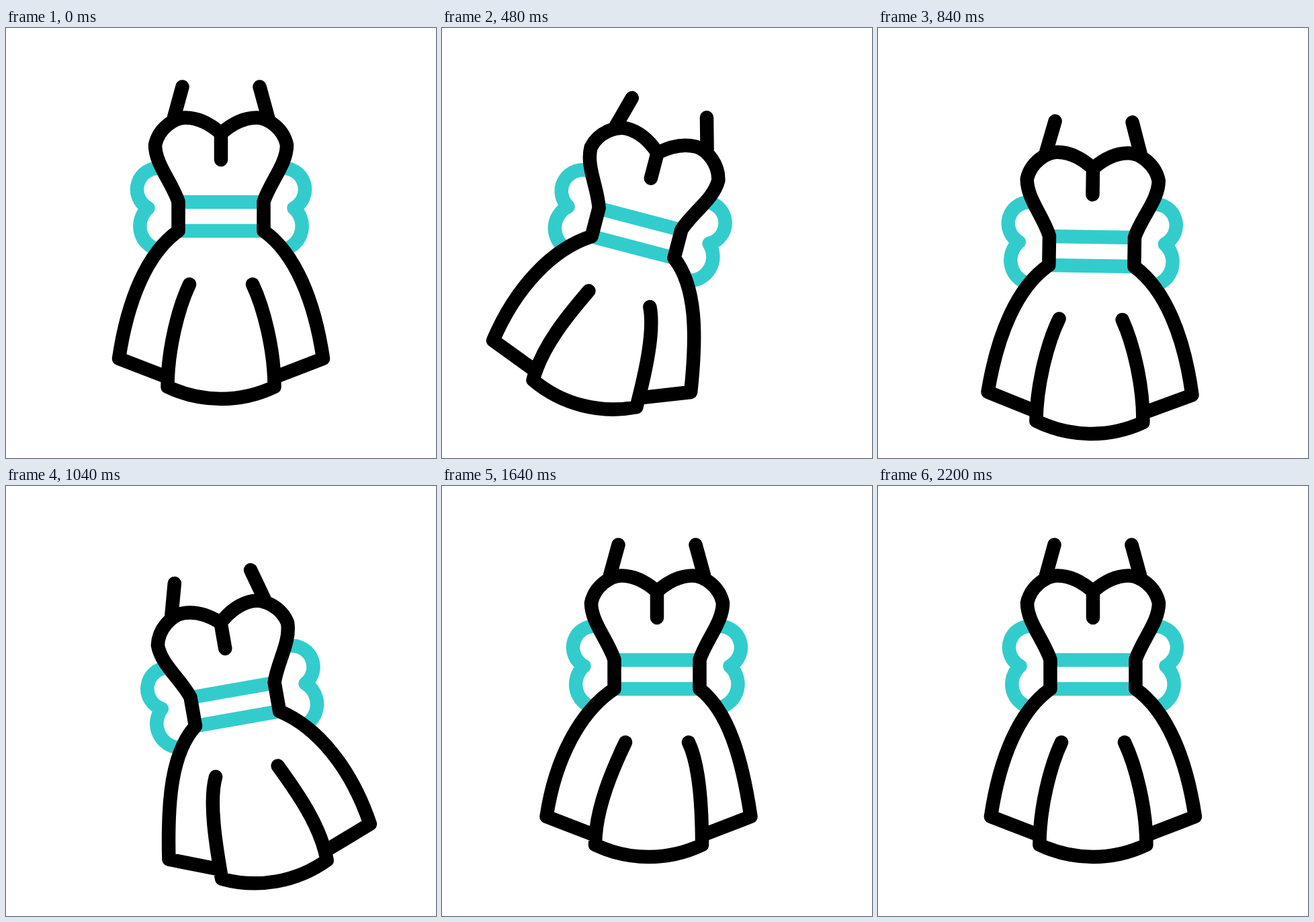
An HTML page for the animation above (2.24 s loop, 640 px wide and 640 px high).

```html
<!DOCTYPE html>
<html lang="en">
<head>
<meta charset="utf-8">
<title>Swinging dress</title>
<style>
  html, body { margin: 0; height: 100%; overflow: hidden; background: #fff; }
  svg { display: block; width: 100%; height: 100%; }
  path { fill: none; stroke-width: 20.5; stroke-linejoin: round; }
</style>
</head>
<body>
<svg viewBox="0 0 640 640">
  <g id="dress">
    <path id="bow" stroke="#3cc"/>
    <path id="cloth" stroke="#000" stroke-linecap="round"/>
  </g>
</svg>
<script>
const LOOP = 2240, STEP = 40;
const el = id => document.getElementById(id);

// Eased rise from 0 to 1 between two times
function ramp(t, from, to) {
  const u = Math.min(1, Math.max(0, (t - from) / (to - from)));
  return u * u * (3 - 2 * u);
}

// The dress sinks and rises, tilts left then right, and the skirt trails behind
const drop = t => 52 * (ramp(t, 150, 765) - ramp(t, 915, 1530));
const tilt = t => 14.7 * ramp(t, 100, 490) - 25.1 * ramp(t, 565, 1080) + 10.4 * ramp(t, 1110, 1560);
const sway = t => -16.2 * ramp(t, 140, 580) + 31.5 * ramp(t, 600, 1060)
  - 29.3 * ramp(t, 1211, 1709) + 14 * ramp(t, 1725, 2220);

// Points of one side: x from the centre line, w is the share of the skirt's shift
function pen(side, dx, dy) {
  const p = (x, y, w = 0) => `${320 + side * x + w * dx} ${y + w * dy} `;
  p.arc = (r, ...end) => `A${r} ${r} 0 0 ${side > 0 ? 1 : 0} ${p(...end)}`;
  return p;
}

const bowHalf = p =>
  `M${p(90, 209)}${p.arc(31.5, 108.5, 268)}${p.arc(36, 93, 330, 0.08)}`;

function clothHalf(p) {
  const strap = `M${p(57.5, 87.5)}L${p(70, 133)}`;
  const bodice = `M${p(0, 157)}C${p(18, 141)}${p(36, 133.5)}${p(53, 133.5)}` +
    `S${p(93, 150)}${p(98, 174)}C${p(98, 203)}${p(73, 229)}${p(63.5, 258.5)}L${p(63.5, 302)}`;
  const skirt = `C${p(110, 335, 0.3)}${p(139, 405, 1)}${p(152, 492, 1)}L${p(82, 519, 1)}`;
  const fold = `M${p(47, 381.5)}C${p(63, 415)}${p(79.5, 478, 1)}${p(79.5, 534, 1)}` +
    `Q${p(42, 552, 1)}${p(0, 552, 1)}`;
  return strap + bodice + skirt + fold;
}

function draw(now) {
  const t = Math.floor(now % LOOP / STEP) * STEP;
  const angle = tilt(t), lift = -angle * angle / 70;
  const sides = [-1, 1].map(side => pen(side, sway(t), lift));
  el('dress').setAttribute('transform', `translate(0 ${drop(t)}) rotate(${angle} 320 160)`);
  el('bow').setAttribute('d', 'M256 259H384M256 302H384' + sides.map(bowHalf).join(''));
  el('cloth').setAttribute('d', 'M320 157V196' + sides.map(clothHalf).join(''));
}

const start = performance.now();
function tick() {
  draw(performance.now() - start);
  requestAnimationFrame(tick);
}
tick();
</script>
</body>
</html>
```
